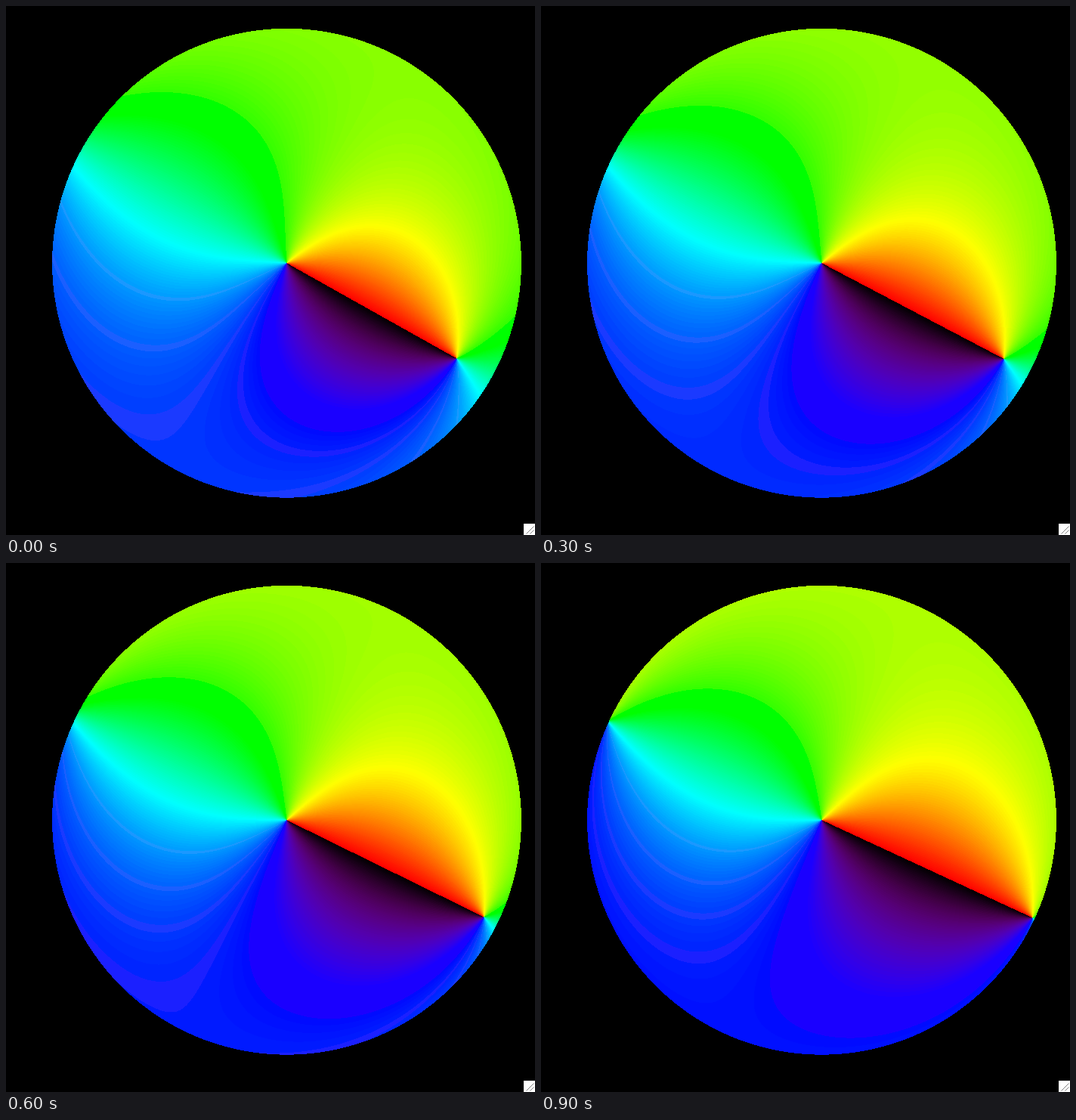
An HTML page with a canvas that plays this animation: 700 by 700 pixels, repeating every 1 s.

```html
<!DOCTYPE html>
<html lang="en">
<head>
<meta charset="utf-8">
<title>Phase portrait</title>
<style>
  html, body { margin: 0; width: 100%; height: 100%; overflow: hidden; background: #000; }
  canvas { display: block; width: 700px; height: 700px; }
</style>
</head>
<body>
<canvas id="stage" width="700" height="700"></canvas>
<script>
const SIZE = 700, CX = 371, CY = 339.75, UNIT = 310, EDGE = 310.4;
const STEP = 100;
// Position of the moving pole for each step, in pixels
const POLE = [
  [596, 466], [601, 466], [606, 466.3], [612, 466.5], [618, 466.7],
  [624, 467.2], [632, 468], [640, 469], [645, 469], [650, 469]
];

const ctx = document.getElementById('stage').getContext('2d');
const image = ctx.createImageData(SIZE, SIZE);
const pixels = new Uint32Array(image.data.buffer);
const clamp = v => Math.round(Math.max(0, Math.min(255, v)));
const pack = (r, g, b) => ((255 << 24) | (clamp(b) << 16) | (clamp(g) << 8) | clamp(r)) >>> 0;

function lerpTable(points, x) {
  for (let k = 1; k < points.length; k++) {
    const [x0, y0] = points[k - 1], [x1, y1] = points[k];
    if (x <= x1) return y0 + (y1 - y0) * (x - x0) / (x1 - x0);
  }
  return points[points.length - 1][1];
}

// Rainbow: black, purple, blue, cyan, green, yellow, red
const PURPLE = [[0, 0], [10, 45], [15, 64], [20, 77], [25, 85], [30, 87], [38, 83],
  [42, 76], [46, 66], [50, 53], [54, 36], [56, 26]];
const SEG = 48.5, BLUE = 61, CYAN = BLUE + SEG, GREEN = CYAN + SEG, YELLOW = GREEN + SEG;
const STREAKS = [67, 72, 79, 90];

function rainbow(i) {
  const ramp = from => 255 * (i - from) / SEG;
  if (i < 56) return pack(lerpTable(PURPLE, i), 0, i * 4.56);
  if (i <= 62) return pack(26, 0, 255);
  if (i < CYAN) return pack(STREAKS.includes(i) ? 27 : 0, ramp(BLUE), 255);
  if (i < GREEN) return pack(0, 255, 255 - ramp(CYAN));
  if (i < 168) return pack(0, 255, 0);
  if (i < YELLOW) return pack(ramp(GREEN), 255, 0);
  return pack(255, 255 - ramp(YELLOW), 0);
}
const palette = Uint32Array.from({ length: 256 }, (_, i) => rainbow(i));
const BLACK = pack(0, 0, 0);

// Phase of z / ((z - a)(1 + conj(a) z)) inside the unit disc
function drawPhase([px, py]) {
  const ax = (px - CX) / UNIT, ay = (CY - py) / UNIT;
  pixels.fill(BLACK);
  for (let row = 0; row < SIZE; row++) {
    const dy = CY - row, y = dy / UNIT;
    if (Math.abs(dy) > EDGE) continue;
    const half = Math.sqrt(EDGE * EDGE - dy * dy);
    const last = Math.floor(CX + half);
    for (let col = Math.ceil(CX - half); col <= last; col++) {
      const x = (col - CX) / UNIT;
      const ux = x - ax, uy = y - ay;
      const vx = 1 + ax * x + ay * y, vy = ax * y - ay * x;
      const dx = ux * vx - uy * vy, di = ux * vy + uy * vx;
      const phase = Math.atan2(y * dx - x * di, x * dx + y * di);
      pixels[row * SIZE + col] = palette[Math.round((0.5 - phase / (2 * Math.PI)) * 255)];
    }
  }
  ctx.putImageData(image, 0, 0);
}

function drawGrip() {
  ctx.fillStyle = '#fff';
  ctx.fillRect(685, 685, 15, 15);
  ctx.strokeStyle = '#808080';
  ctx.lineWidth = 1;
  ctx.beginPath();
  for (const d of [10, 5]) {
    ctx.moveTo(698.5 - d, 698.5);
    ctx.lineTo(698.5, 698.5 - d);
  }
  ctx.stroke();
}

let shown = -1;
const start = performance.now();
function tick() {
  const t = Math.max(0, performance.now() - start);
  const step = Math.floor(t / STEP) % POLE.length;
  if (step !== shown) {
    shown = step;
    drawPhase(POLE[step]);
    drawGrip();
  }
  requestAnimationFrame(tick);
}
tick();
</script>
</body>
</html>
```
